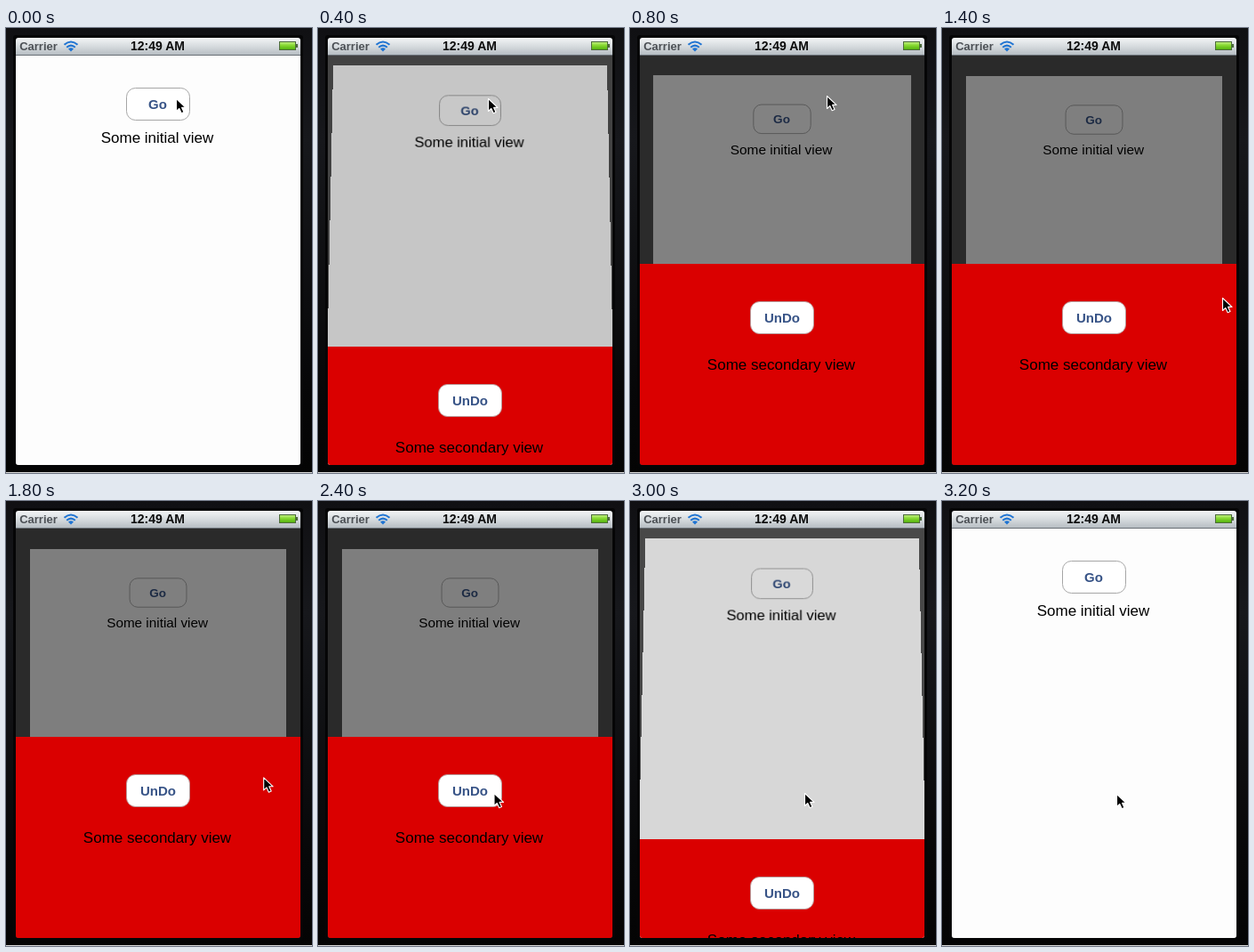
An HTML page for the animation above (3.4 s loop, 344 by 500 pixels).

```html
<!DOCTYPE html>
<html lang="en">
<head>
<meta charset="utf-8">
<title>Semi-modal view</title>
<style>
  html, body { margin: 0; width: 100%; height: 100%; overflow: hidden; background: #08080a; }
  #stage { position: absolute; left: 0; top: 0; width: 344px; height: 500px; overflow: hidden; }
  svg { position: absolute; left: 0; top: 0; display: block; }
  text { font-family: "Liberation Sans", Arial, sans-serif; text-anchor: middle; }
  #screen { position: absolute; left: 11px; top: 31px; width: 320px; height: 460px;
    overflow: hidden; background: #555; border-radius: 0 0 3px 3px; }
  #view, #shade { position: absolute; left: 0; top: 0; width: 320px; height: 460px; }
  #view { background: #fdfdfd; transform-origin: 50% 50%; }
  #shade { background: #000; }
  .label { font-size: 17px; fill: #000; }
  .action { font-size: 15px; font-weight: bold; fill: #385487; }
</style>
</head>
<body>
<div id="stage">
  <svg width="344" height="500">
    <defs>
      <linearGradient id="bezel" x2="0" y2="1">
        <stop offset="0" stop-color="#101013"/>
        <stop offset=".25" stop-color="#17181c"/>
        <stop offset=".8" stop-color="#070708"/>
        <stop offset="1" stop-color="#040404"/>
      </linearGradient>
    </defs>
    <rect width="344" height="500" fill="url(#bezel)"/>
    <rect x="8" y="8" width="326" height="486" rx="3" fill="#050506"/>
    <rect y="499" width="344" height="1" fill="#d8d8d8"/>
  </svg>

  <div id="screen">
    <div id="view">
      <svg width="320" height="460">
        <rect x="124.5" y="36.5" width="71" height="36" rx="10" fill="#fff" stroke="#a6a6a6"/>
        <text class="action" x="159.5" y="60">Go</text>
        <text class="label" x="159" y="98">Some initial view</text>
      </svg>
    </div>
    <div id="shade"></div>
    <svg width="320" height="460">
      <g id="sheet">
        <rect width="320" height="230" fill="#da0000"/>
        <rect x="124.5" y="42.5" width="71" height="36" rx="10" fill="#fff" stroke="#b99a9a"/>
        <text class="action" x="160" y="66">UnDo</text>
        <text class="label" x="159" y="119">Some secondary view</text>
      </g>
    </svg>
  </div>

  <svg width="344" height="500">
    <defs>
      <linearGradient id="bar" x2="0" y2="1">
        <stop offset="0" stop-color="#f3f5f6"/>
        <stop offset=".5" stop-color="#d5dadd"/>
        <stop offset="1" stop-color="#b3bac0"/>
      </linearGradient>
      <linearGradient id="charge" x2="0" y2="1">
        <stop offset="0" stop-color="#c4ef86"/>
        <stop offset=".45" stop-color="#86d831"/>
        <stop offset="1" stop-color="#4fae0c"/>
      </linearGradient>
    </defs>
    <path d="M11 31V14q0-3 3-3H328q3 0 3 3V31Z" fill="url(#bar)"/>
    <rect x="11" y="30" width="320" height="1" fill="#696f76"/>
    <text x="36.5" y="25" font-size="13" font-weight="bold" fill="#4d5156">Carrier</text>
    <text x="170.5" y="25" font-size="14" font-weight="bold" fill="#0c0c0c">12:49 AM</text>
    <g fill="none" stroke="#1f74d2" stroke-width="2">
      <path d="M65.5 18.8Q73 12.2 80.5 18.8"/>
      <path d="M68.2 21.8Q73 17.4 77.8 21.8"/>
      <path d="M70 23.6Q73 21 76 23.6L73 26.6Z" fill="#1f74d2" stroke="none"/>
    </g>
    <rect x="307.5" y="15.5" width="18" height="9" fill="url(#charge)" stroke="#4c6b3a"/>
    <rect x="326" y="18" width="2" height="4" fill="#4c6b3a"/>
    <path id="cursor" d="M.5 .5V14.5L3.8 11.5L6.2 16.8L9 15.6L6.6 10.4H11Z"
      fill="#000" stroke="#fff" stroke-width="1.1" stroke-linejoin="round"/>
  </svg>
</div>
<script>
const LOOP = 3400, STEP = 200;

// time, scale, vertical squash, perspective, shade, sheet top
const poses = [
  [0, 1, 1, 0, 0, 460],
  [200, .998, 1, .004, .02, 451],
  [400, .99, .99, .029, .216, 327],
  [600, .955, .985, .05, .39, 237],
  [800, .906, .998, 0, .49, 234],
  [1000, .9, 1, 0, .5, 234],
  [2600, .9, 1, 0, .5, 234],
  [2800, .994, .988, .112, .373, 234],
  [3000, .99, .99, .03, .15, 349],
  [3200, 1, 1, 0, 0, 460]
];

// time, x, y
const pointer = [
  [0, 191, 79], [500, 191, 79], [800, 221, 76], [1100, 292, 170],
  [1400, 315, 303], [1700, 312, 306], [2200, 198, 328],
  [3000, 196, 328], [3200, 196, 329]
];

const el = id => document.getElementById(id);
const view = el("view"), shade = el("shade"), sheet = el("sheet"), cursor = el("cursor");

function sample(keys, t) {
  const i = keys.findIndex(k => k[0] > t);
  if (i < 0) return keys[keys.length - 1].slice(1);
  const a = keys[i - 1], b = keys[i];
  const u = (t - a[0]) / (b[0] - a[0]);
  return a.slice(1).map((v, j) => v + (b[j + 1] - v) * u);
}

function draw(time) {
  const t = Math.floor((time % LOOP) / STEP) * STEP;
  const [scale, squash, depth, dim, top] = sample(poses, t);
  const [x, y] = sample(pointer, t);
  view.style.transform =
    `matrix3d(${scale},0,0,0, 0,${scale * squash},0,${-depth / 230}, 0,0,1,0, 0,0,0,1)`;
  shade.style.opacity = dim;
  sheet.setAttribute("transform", `translate(0 ${top})`);
  cursor.setAttribute("transform", `translate(${x} ${y})`);
}

const start = performance.now();
function tick() {
  draw(performance.now() - start);
  requestAnimationFrame(tick);
}
tick();
</script>
</body>
</html>
```
